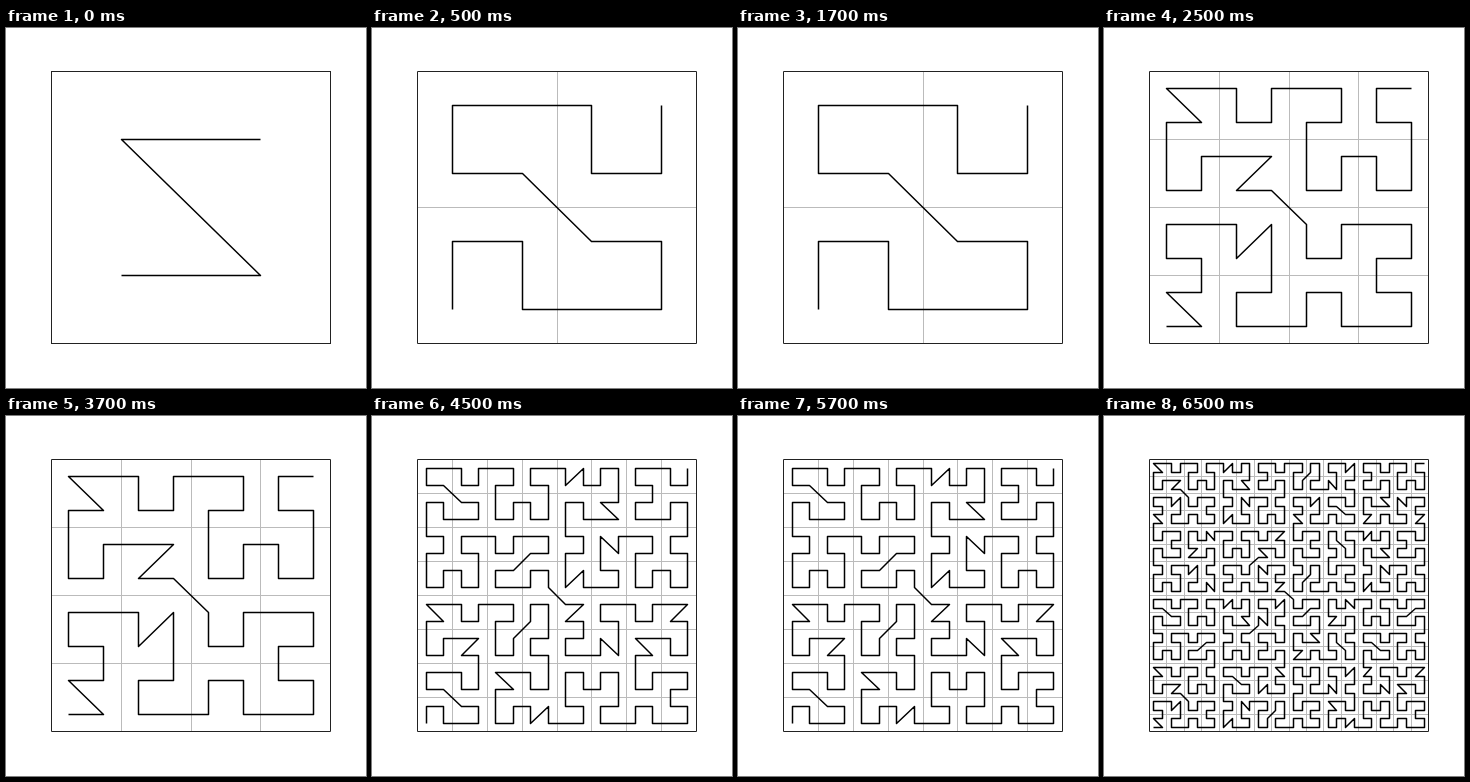
Recreate the animation shown at these times as an HTML page with a canvas. Size 360x360 px, loop 8 s.

```html
<!DOCTYPE html>
<html lang="en">
<head>
<meta charset="utf-8">
<title>Space-filling curve</title>
<style>
  html, body { margin: 0; width: 100%; height: 100%; overflow: hidden; background: #fff; }
  canvas { display: block; }
</style>
</head>
<body>
<canvas width="360" height="360"></canvas>
<script>
const ctx = document.querySelector('canvas').getContext('2d');
const LEFT = 45.5, TOP = 43.5, WIDTH = 279, HEIGHT = 272;

// AR²W² curve. Each rule lists the four sub-cells in visiting order: the type
// (lower case = run backwards) and the order in which its own corners are met.
const RULES = {
  A: ['B0231', 'D0132', 'b1023', 'E2013'],
  B: ['B0321', 'B0123', 'd0123', 'E2103'],
  D: ['B0321', 'A0132', 'B1230', 'A1023'],
  E: ['e0321', 'A0132', 'D1230', 'A1203'],
};
const Z_SHAPE = [[1, -1], [-1, -1], [1, 1], [-1, 1]];

// Cell centres along the curve; half is half the side of the current cell.
function walk(type, corners, x, y, half, depth) {
  if (!depth) return [[x, y]];
  half /= 2;
  return RULES[type].flatMap(([kind, ...order], i) => {
    const [dx, dy] = corners[i];
    const next = order.map(k => corners[k]);
    const name = kind.toUpperCase();
    const back = kind !== name;
    if (back) next.reverse();
    const path = walk(name, next, x + dx * half, y + dy * half, half, depth - 1);
    return back ? path.reverse() : path;
  });
}

const snap = v => Math.floor(v) + 0.5;
const px = u => snap(LEFT + u * WIDTH);
const py = v => snap(TOP + v * HEIGHT);

function drawGrid(cells) {
  ctx.beginPath();
  for (let i = 1; i < cells; i++) {
    const x = px(i / cells), y = py(i / cells);
    ctx.moveTo(x, TOP);
    ctx.lineTo(x, TOP + HEIGHT);
    ctx.moveTo(LEFT, y);
    ctx.lineTo(LEFT + WIDTH, y);
  }
  ctx.lineWidth = 1;
  ctx.strokeStyle = '#bbb';
  ctx.stroke();
}

function drawCurve(level) {
  ctx.beginPath();
  for (const [u, v] of walk('A', Z_SHAPE, 0.5, 0.5, 0.5, level)) ctx.lineTo(px(u), py(v));
  ctx.lineWidth = 1.5;
  ctx.lineJoin = 'round';
  ctx.strokeStyle = '#000';
  ctx.stroke();
}

function draw(level) {
  ctx.fillStyle = '#fff';
  ctx.fillRect(0, 0, 360, 360);
  drawGrid(2 ** (level - 1));
  ctx.lineWidth = 1;
  ctx.strokeStyle = '#222';
  ctx.strokeRect(LEFT, TOP, WIDTH, HEIGHT);
  drawCurve(level);
}

let shown = 0;
const start = performance.now();

function tick() {
  const t = (performance.now() - start) % 8000;
  const level = 1 + Math.floor((t + 1500) / 2000);
  if (level !== shown) draw(shown = level);
  requestAnimationFrame(tick);
}
tick();
</script>
</body>
</html>
```
